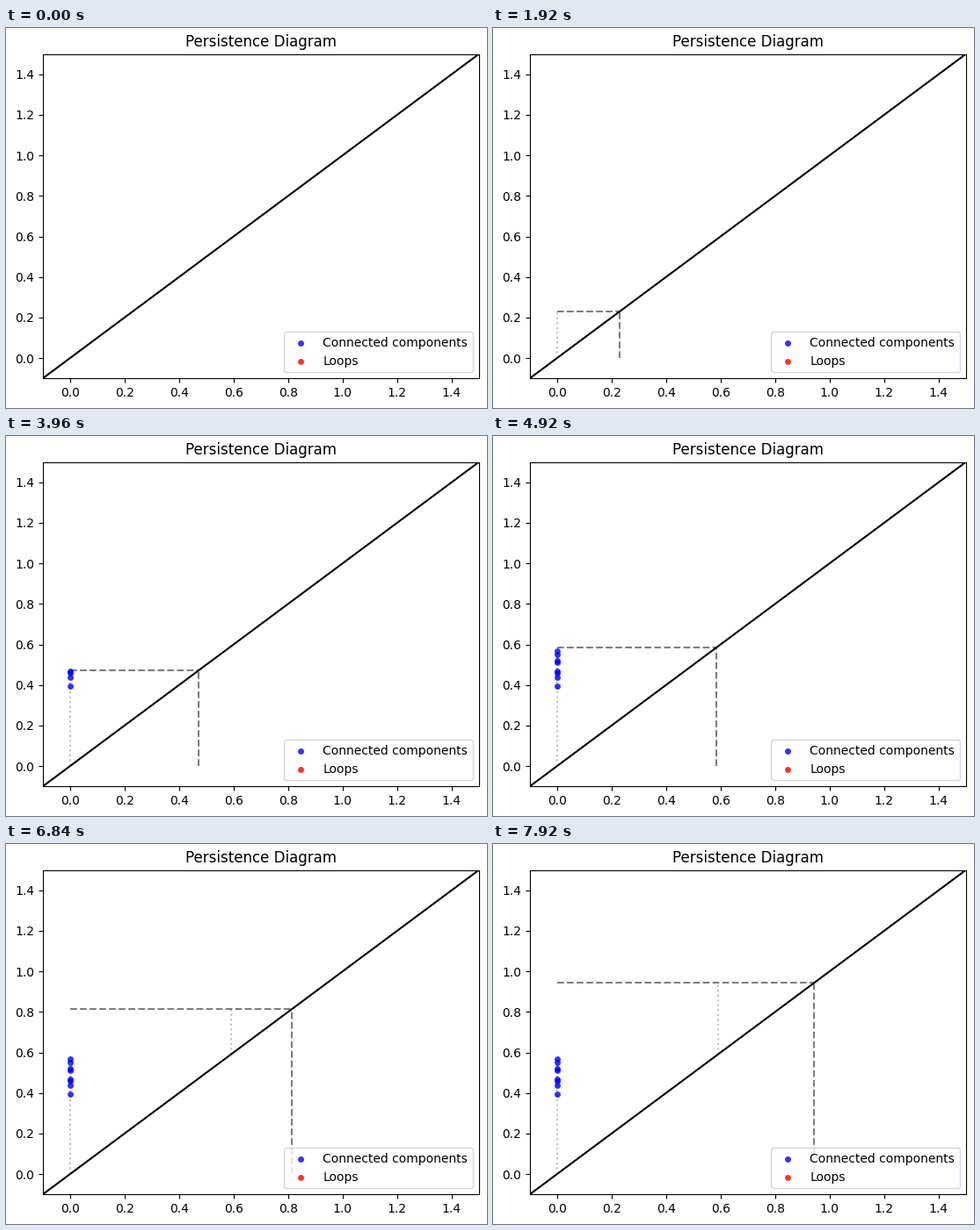
A matplotlib script that plays this animation: 547x433 px, repeating every 8000 ms.

```python
import matplotlib.pyplot as plt
import numpy as np
from matplotlib.animation import FuncAnimation

W, H, DPI = 547, 433, 100
TICK = 40            # ms per drawn frame
HOLD = 3             # drawn frames per step of the sweep
FRAMES = 200
STEP = 1 / 70        # growth of the radius per step

deaths = np.array([0.393, 0.440, 0.461, 0.469, 0.512, 0.522, 0.552, 0.566])
LOOP_BIRTH = 0.591

plt.rcParams["font.family"] = "DejaVu Sans"
fig = plt.figure(figsize=(W / DPI, H / DPI), dpi=DPI, facecolor="white")
ax = fig.add_axes([41.72 / W, 33.72 / H, 496 / W, 369.6 / H])
ax.set(xlim=(-0.1, 1.5), ylim=(-0.1, 1.5), title="Persistence Diagram")
ticks = np.arange(0, 1.5, 0.2)
ax.set_xticks(ticks)
ax.set_yticks(ticks)


def dots(color, label):
    return ax.scatter([], [], s=25, c=color, alpha=0.8, linewidths=0,
                      label=label, zorder=3)


def guide(style, alpha):
    return ax.plot([], [], style, color="black", alpha=alpha)[0]


ax.plot([-0.1, 1.5], [-0.1, 1.5], color="black")
components = dots("blue", "Connected components")
loops = dots("red", "Loops")
across, down = guide("--", 0.5), guide("--", 0.5)
stem, loop_stem = guide(":", 0.25), guide(":", 0.25)
ax.legend(loc="lower right")


def update(i):
    t = i // HOLD * STEP
    across.set_data([0, t], [t, t])
    down.set_data([t, t], [0, t])
    stem.set_data([0, 0], [0, min(t, deaths[-1])])
    if t > LOOP_BIRTH:
        loop_stem.set_data([LOOP_BIRTH] * 2, [LOOP_BIRTH, t])
    else:
        loop_stem.set_data([], [])
    dead = deaths[deaths <= t]
    components.set_offsets(np.column_stack([np.zeros_like(dead), dead]))
    return across, down, stem, loop_stem, components


anim = FuncAnimation(fig, update, frames=FRAMES, interval=TICK,
                     init_func=lambda: update(0), repeat=True,
                     repeat_delay=0, blit=False)
plt.show()
```
